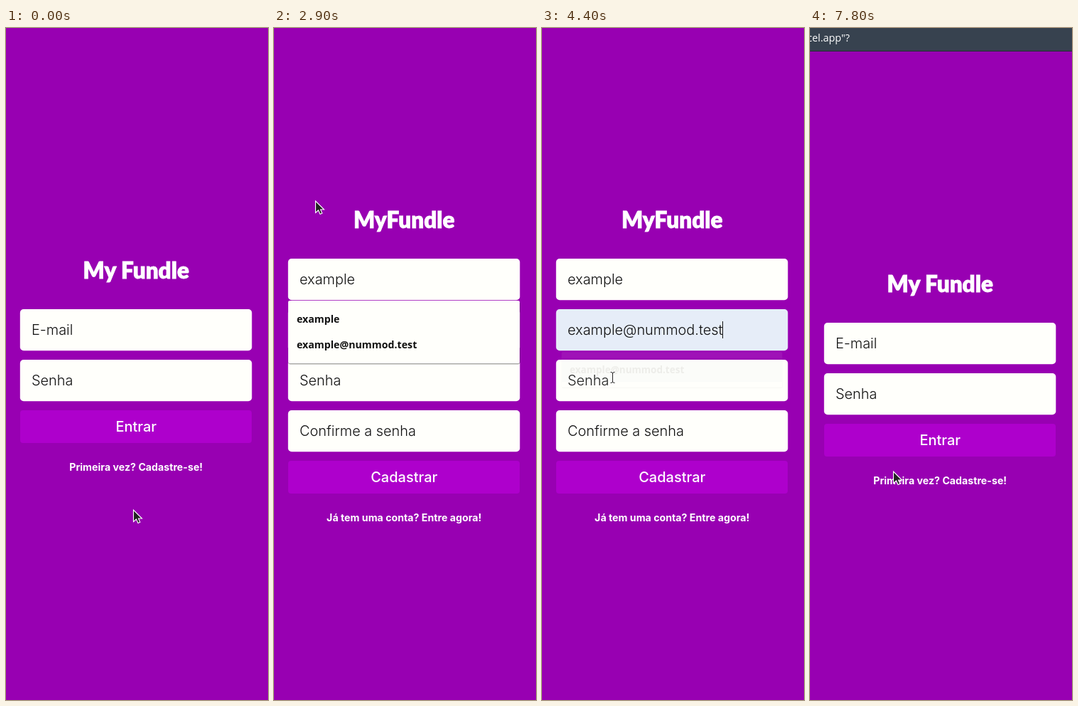
These frames come from a looping animation (369 by 944 pixels, 8000 ms). An HTML page:

```html
<!DOCTYPE html>
<html lang="pt-BR">
<head>
<meta charset="utf-8">
<style>
  html, body { margin: 0; width: 100%; height: 100%; overflow: hidden; background: #9800b2; }
  svg { display: block; width: 100%; height: 100%; }
  text { white-space: pre; }
  .title { font: 900 31.5px Lato, sans-serif; fill: #fff; stroke: #fff; stroke-width: .8px; text-anchor: middle; }
  .field { font: 300 19.9px Inter, sans-serif; fill: #111; }
  .button { font: 500 20px Inter, sans-serif; fill: #fff; text-anchor: middle; }
  .link { font: 700 14.2px Inter, sans-serif; fill: #fff; text-anchor: middle; }
  .item { font: 700 14.2px "Open Sans", sans-serif; fill: #111; }
  .preview { font: 13.33px "Liberation Sans", Arial, sans-serif; fill: #111; }
  .bar { font: 14.4px "Open Sans", sans-serif; fill: #fff; text-anchor: end; }
</style>
</head>
<body>
<svg id="stage" viewBox="0 0 369 944"></svg>
<script>
const LOOP = 8000, STEP = 100, MIDDLE = 183.2, PAPER = '#fffffb', AUTOFILL = '#e6edf8';
const NAME = 'example', EMAIL = 'example@nummod.test';
const NAMES = [NAME, EMAIL, 'usuario', 'teste', 'visitante', 'convidado'];
const EMAILS = [EMAIL, 'teste@nummod.test', 'usuario@nummod.test', 'conta@nummod.test',
                'visitante@nummod.test', 'convidado@nummod.test'];

// Time, x and y of the hot spot, pointer shape
const POINTER = [
  [0, 179.5, 677, 'arrow'], [100, 183, 655, 'arrow'], [200, 186, 637, 'arrow'],
  [400, 186, 627, 'hand'], [500, 190, 618, 'hand'],
  [1700, 197, 560, 'arrow'], [1800, 138, 400, 'beam'],
  [2000, 124, 372, 'beam'], [2100, 112, 354, 'beam'], [2200, 108, 349, 'beam'],
  [2500, 85, 300, 'arrow'], [2600, 58.5, 243, 'arrow'],
  [3000, 60, 270, 'arrow'], [3100, 66, 330, 'arrow'], [3200, 74, 388, 'arrow'], [3300, 78, 402, 'arrow'],
  [3400, 86, 430, 'beam'], [3500, 92, 440, 'beam'],
  [3700, 99, 464, 'arrow'], [3800, 101.5, 476, 'arrow'],
  [4300, 100, 484, 'arrow'], [4400, 99.5, 491, 'beam'],
  [5000, 104, 530, 'beam'], [5100, 109, 559, 'beam'], [5300, 110, 560, 'beam'],
  [5800, 112, 572, 'beam'], [5900, 115, 592, 'beam'], [6000, 118, 612, 'hand'],
  [6100, 119, 618, 'hand'], [6200, 120, 622, 'hand'], [7600, 117.5, 623, 'arrow']
];

const stage = document.getElementById('stage');
const ruler = document.createElement('canvas').getContext('2d');

const rect = (x, y, w, h, fill, r = 0) =>
  `<rect x="${x}" y="${y}" width="${w}" height="${h}" rx="${r}" fill="${fill}"/>`;
const text = (kind, x, y, words) => `<text class="${kind}" x="${x}" y="${y}">${words}</text>`;

function textEnd(words) {
  ruler.font = '300 19.9px Inter, sans-serif';
  return 36 + ruler.measureText(words).width;
}

const caret = (x, fieldY) => rect(Math.round(x), fieldY + 17, 1, 24, '#111');

function field(y, { words = '', dots = 0, fill = PAPER, kind = 'field', caretOn = false }) {
  let out = rect(19.8, y, 326.5, 58.2, fill, 5);
  for (let i = 0; i < dots; i++) out += `<circle cx="${39.5 + 7 * i}" cy="${y + 29}" r="2.2" fill="#111"/>`;
  if (!dots) out += text(kind, 36, y + 36, words);
  if (caretOn) out += caret(caretOn === 'start' ? 36 : dots ? 36 + 7 * dots : textEnd(words), y);
  return out;
}

function form(y, title, fields, button, link) {
  const end = y + 71 * fields.length;
  return text('title', MIDDLE, y - 43.5, title) +
    fields.map((options, i) => field(y + 71 * i, options)).join('') +
    rect(20, end, 326, 46, '#ae00cc', 4) +
    text('button', MIDDLE, end + 29.5, button) + text('link', MIDDLE, end + 85, link);
}

// A closing menu shrinks towards its centre while it fades.
function menu(y, items, hovered = -1, opacity = 1) {
  const height = 16 + 36 * items.length, scale = .95 + .05 * opacity, middle = y + height / 2;
  return `<g opacity="${opacity}" transform="translate(183 ${middle}) scale(${scale}) translate(-183 ${-middle})">` +
    rect(20, y + 1.5, 326.5, height, '#0005', 3) + rect(20, y, 326, height, PAPER, 2) +
    (hovered < 0 ? '' : rect(20, y + 8 + 36 * hovered, 326, 36, '#d5dfe4')) +
    items.map((item, i) => text('item', 32, y + 31 + 36 * i, item)).join('') + '</g>';
}

function pointer(t) {
  const [, x, y, shape] = POINTER.findLast(key => key[0] <= t);
  const at = (dx, path) => `<g transform="translate(${x - dx} ${y})">${path}</g>`;
  if (shape === 'arrow') return at(0,
    '<path d="M0 0V16.5L4 13 6.5 18.5 9.3 17.2 7 12H12Z" fill="#222" stroke="#fff" stroke-width="1.1"/>');
  if (shape === 'hand') return at(5.5,
    '<path d="M4 9V2a1.6 1.6 0 0 1 3.2 0V6.5q1.5-1 2.7.4 1.4-.8 2.6.5 2.2-.6 2.5 1.2V13l-1.6 4.8H6' +
    'L.8 10.6Q.3 9 1.8 8.6L4 10.5Z" fill="#fff" stroke="#222"/>');
  const beam = 'd="M-3-7.5Q0-7.5 0-6 0-7.5 3-7.5M0-6V6M-3 7.5Q0 7.5 0 6 0 7.5 3 7.5" fill="none"';
  return at(0, `<path ${beam} stroke="#fff" stroke-width="2.4" opacity=".6"/><path ${beam} stroke="#222"/>`);
}

function login(t) {
  const open = Math.max(0, Math.min(1, (t - 7500) / 300));
  const page = form(395 + Math.round(19 * open), 'My Fundle',
    [{ words: 'E-mail' }, { words: 'Senha' }], 'Entrar', 'Primeira vez? Cadastre-se!');
  if (!open) return page;
  const bottom = Math.round(33 * open);
  return page + rect(0, 0, 369, bottom, '#37424f') + rect(0, bottom - 1, 369, 1, '#252c36') +
    text('bar', 56, bottom - 14, 'vercel.app"?');
}

function signup(t) {
  const between = (from, to) => t >= from && t < to;
  const typed = t < 2500 ? 0 : [1, 3, 5, 6][(t - 2500) / STEP] ?? 7;
  const name = { words: typed ? NAME.slice(0, typed) : 'Nome',
                 caretOn: between(2200, 2500) ? 'start' : between(2500, 2900) };

  let email = { words: 'E-mail', caretOn: between(3500, 3700) && 'start' };
  if (between(3700, 3800)) email = { words: 'e', caretOn: true };
  if (between(3800, 4300)) email = { words: EMAIL, fill: AUTOFILL, kind: 'preview' };
  if (t >= 4300) email = { words: EMAIL, fill: AUTOFILL, caretOn: t < 4600 };

  const secret = t < 4800 ? 0 : [2, 4, 6][(t - 4800) / STEP] ?? 7;
  const password = { words: 'Senha', dots: secret,
                     caretOn: between(4600, 4800) ? 'start' : between(4800, 5300) };
  const confirm = { words: 'Confirme a senha', dots: t < 5600 ? 0 : 7,
                    caretOn: between(5300, 5600) ? 'start' : between(5600, 6200) };

  let out = form(324, 'MyFundle', [name, email, password, confirm],
    'Cadastrar', 'Já tem uma conta? Entre agora!');
  if (between(2200, 2500)) out += menu(383, NAMES);
  if (between(2500, 3400)) out += menu(383, NAMES.slice(0, 2), t === 3300 ? 0 : -1);
  if (t === 3400) out += menu(383, NAMES.slice(0, 2), 0, .07);
  if (between(3500, 3700)) out += menu(454, EMAILS);
  if (between(3700, 4300)) out += menu(454, [EMAIL], t < 3800 ? -1 : 0);
  if (between(4300, 4500)) out += menu(454, [EMAIL], 0, t < 4400 ? .5 : .07);
  return out;
}

let shown = -1;
function draw() {
  const t = Math.floor(performance.now() % LOOP / STEP) * STEP;
  if (t !== shown) {
    shown = t;
    const page = t >= 1500 && t < 7500 ? signup(t) : login(t);
    stage.innerHTML = rect(0, 0, 369, 944, '#9800b2') + page + pointer(t);
  }
  requestAnimationFrame(draw);
}
draw();
</script>
</body>
</html>
```
